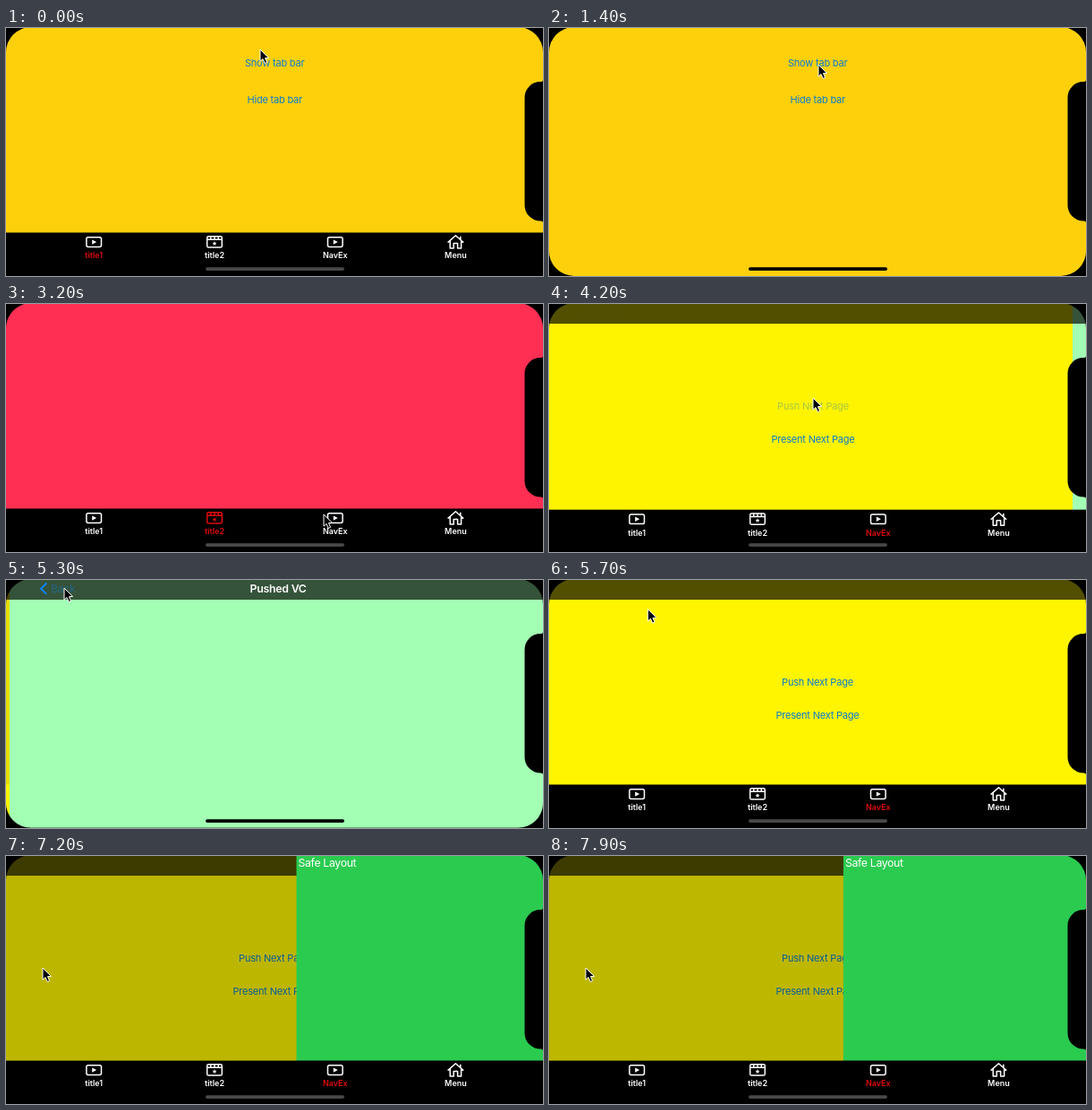
These frames come from a looping animation (600 by 277 pixels, 8 s). An HTML page:

```html
<!DOCTYPE html>
<html lang="en">
<head>
<meta charset="utf-8">
<title>Tab bar demo</title>
<style>
  html, body { margin: 0; width: 100%; height: 100%; overflow: hidden; background: #000; }
  svg { display: block; width: 600px; height: 277px; font-family: Inter, Roboto, sans-serif; }
  .link { font-size: 11px; letter-spacing: -.2px; fill: #0a7bd0; text-anchor: middle; }
  .bar-title { font-size: 12.3px; font-weight: 600; letter-spacing: -.25px; fill: #fff; text-anchor: middle; }
  .big { font-size: 12.3px; letter-spacing: -.35px; }
  .tab { color: #fff; }
  .tab text { font-size: 9px; font-weight: 600; fill: currentColor; text-anchor: middle; }
  .icon { fill: none; stroke: currentColor; stroke-width: 1.5; stroke-linejoin: round; }
  .solid { fill: currentColor; stroke: none; }
  .tab.on { color: #e00a0a; }
  .tab.on .fixed { color: #fff; }
</style>
</head>
<body>
<svg viewBox="0 0 600 277">
  <defs>
    <g id="play" class="icon">
      <rect x="-8.3" y="233.8" width="16.6" height="10.6" rx="1.8"/>
      <path class="solid" d="M-2 236.4L3 239.1L-2 241.8Z"/>
    </g>
    <mask id="corners">
      <rect width="600" height="277" fill="#fff"/>
      <rect y="-1" width="600" height="278" rx="28"/>
    </mask>
  </defs>

  <g id="first">
    <rect width="600" height="277" fill="#fed00c"/>
    <text id="show" class="link" x="300.2" y="43">Show tab bar</text>
    <text id="hide" class="link" x="300.2" y="84">Hide tab bar</text>
  </g>

  <rect id="second" width="600" height="277" fill="#ff2f53"/>

  <g id="nav">
    <g id="root">
      <rect width="800" height="277" fill="#fff500"/>
      <text id="push" class="link" x="300" y="117.8">Push Next Page</text>
      <text class="link" x="300" y="155">Present Next Page</text>
    </g>
    <rect id="shade" width="600" height="228.5"/>
    <rect id="pushed" width="600" height="277" fill="#a2ffb3"/>
    <rect width="600" height="22" fill-opacity=".675"/>
    <g id="back" fill="#0a84ff">
      <path d="M45.3 3.5L39 9.7L45.3 15.9" fill="none" stroke="#0a84ff" stroke-width="2"/>
      <text id="backText" class="big" x="50" y="14">Back</text>
    </g>
    <text id="title" class="bar-title" x="302.5" y="14">Pushed VC</text>
    <rect id="dim" width="600" height="228.5"/>
    <g id="menu">
      <rect width="600" height="229" fill="#2bcb50"/>
      <text class="big" x="2" y="12" fill="#fff">Safe Layout</text>
    </g>
  </g>

  <g id="tabs">
    <rect y="228.5" width="600" height="50"/>
    <g class="tab" transform="translate(98.2)">
      <use href="#play" class="fixed"/>
      <text y="257.3">title1</text>
    </g>
    <g class="tab" transform="translate(233)">
      <g class="icon">
        <rect x="-8.3" y="232.8" width="16.6" height="12.2" rx="1.6"/>
        <path d="M-8 236.3H8M-4.3 233V236M0 233V236M4.3 233V236"/>
        <path class="solid" d="M0 238L.7 239.8L2.5 239.9L1.1 241.1L1.6 242.9L0 241.9L-1.6 242.9L-1.1 241.1L-2.5 239.9L-.7 239.8Z"/>
      </g>
      <text y="257.3">title2</text>
    </g>
    <g class="tab" transform="translate(367.8)">
      <use href="#play" class="fixed"/>
      <text y="257.3">NavEx</text>
    </g>
    <g class="tab" transform="translate(502.4)">
      <path class="icon" d="M-8.8 239.6L0 231.8L8.8 239.6M-6.2 237.8V246H-2.2V240.6H2.2V246H6.2V237.8M5.4 236V232.8"/>
      <text y="257.3">Menu</text>
    </g>
  </g>

  <rect id="home" x="223" y="267.2" width="155" height="3.8" rx="1.9"/>
  <rect width="600" height="277" mask="url(#corners)"/>
  <path d="M600 58Q600 60 597 60A17.5 17.5 0 0 0 579.5 77.5V198A17.5 17.5 0 0 0 597 215.5Q600 215.5 600 217.5Z"/>
  <path id="cursor" d="M0 0V13.2L3 10.5L5.2 15.4L7.6 14.4L5.5 9.6L9.6 9.4Z" stroke="#fff"/>
</svg>

<script>
const LOOP = 8000, STEP = 100;
const MENU_WIDTH = 275.5, BAR_HEIGHT = 48.5, TRAVEL = 500;
const el = Object.fromEntries([...document.querySelectorAll('[id]')].map(n => [n.id, n]));
const tabs = document.querySelectorAll('.tab');

// The pointer glides to each place, leaving it at the given time.
const start = { x: 284, y: 24 };
const glides = [
  { from: 0, x: 299, y: 80 },
  { from: 800, x: 301, y: 41 },
  { from: 1800, x: 233, y: 248 },
  { from: 2600, x: 355, y: 235 },
  { from: 3400, x: 295, y: 105 },
  { from: 4600, x: 65, y: 9 },
  { from: 5600, x: 502, y: 237 },
  { from: 6600, x: 41, y: 125 }
];

// Smooth rise from 0 to 1.
function ramp(t, from, length) {
  const k = Math.min(1, Math.max(0, (t - from) / length));
  return k * k * (3 - 2 * k);
}

function pointerAt(t) {
  let { x, y } = start;
  for (const glide of glides) {
    const k = ramp(t, glide.from, TRAVEL);
    x += (glide.x - x) * k;
    y += (glide.y - y) * k;
  }
  return [x, y];
}

const during = (t, from, to) => t >= from && t < to;
const move = (node, x, y = 0) => node.setAttribute('transform', `translate(${x} ${y})`);
const fade = (node, v) => node.setAttribute('opacity', v);
const show = (node, on) => node.setAttribute('display', on ? 'inline' : 'none');
const press = (node, t, from) => fade(node, during(t, from, from + 200) ? .35 : 1);

function draw(t) {
  const page = t < 2500 ? 0 : t < 3400 ? 1 : 2;
  const selected = during(t, 6200, 6500) ? 3 : page;
  const pushed = ramp(t, 4160, 425) - ramp(t, 5280, 420);
  const opened = ramp(t, 6100, 310) - ramp(t, 7870, 400);
  const hidden = page === 2 ? pushed : ramp(t, 500, 300) - ramp(t, 1500, 300);

  [el.first, el.second, el.nav].forEach((node, i) => show(node, i === page));
  tabs.forEach((tab, i) => tab.classList.toggle('on', i === selected));
  press(el.hide, t, 400);
  press(el.show, t, 1500);
  press(el.push, t, 4100);
  press(el.backText, t, 5200);

  move(el.root, -200 * pushed);
  fade(el.shade, .1 * pushed);
  move(el.pushed, 600 * (1 - pushed));
  fade(el.back, pushed);
  move(el.title, 250 * (1 - pushed));
  fade(el.title, pushed ** 2);

  fade(el.dim, .26 * opened);
  move(el.menu, 600 - MENU_WIDTH * opened);

  move(el.tabs, 0, BAR_HEIGHT * hidden);
  const grey = Math.round(72 * (1 - hidden));
  el.home.setAttribute('fill', `rgb(${grey},${grey},${grey})`);
  move(el.cursor, ...pointerAt(t));
}

const began = performance.now();
function tick() {
  const t = (performance.now() - began) % LOOP;
  draw(Math.floor(t / STEP) * STEP);
  requestAnimationFrame(tick);
}
tick();
</script>
</body>
</html>
```
